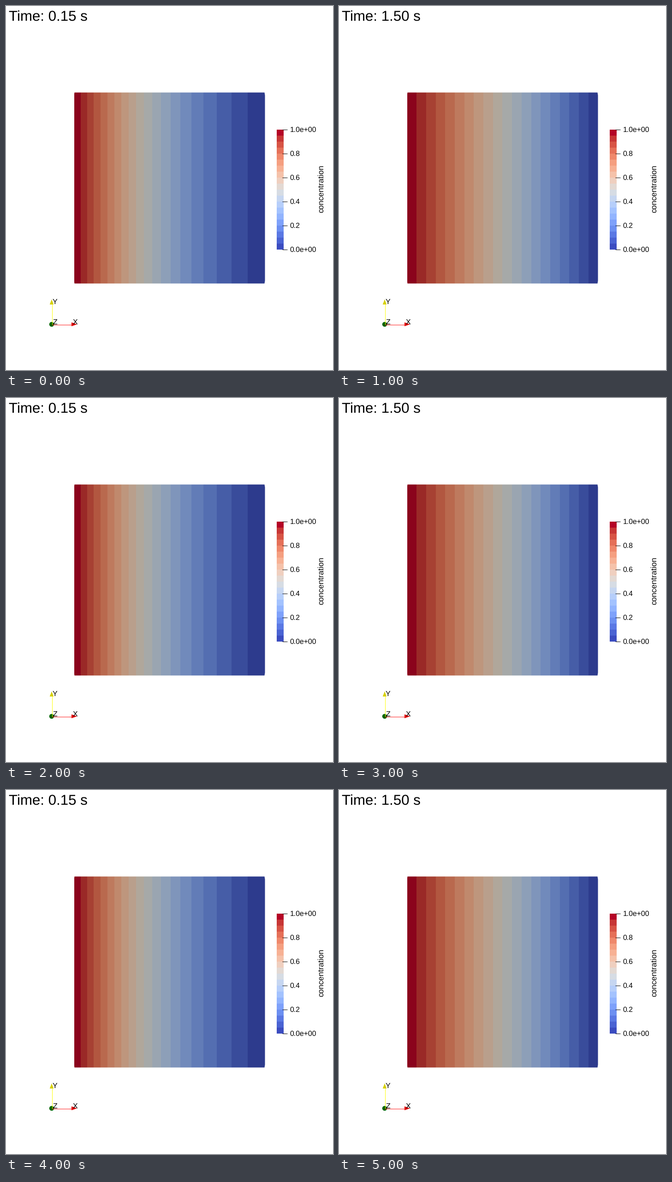
These frames come from a looping animation (709x789 px, 6000 ms). A matplotlib script:

```python
import numpy as np
import matplotlib.pyplot as plt
from matplotlib.animation import FuncAnimation
from matplotlib.patches import Circle, Polygon, Rectangle

W, H, DPI = 709, 789, 128
PX = 72 / DPI  # one pixel in points
LEVELS = 20
HALF = 207  # half the side of the square field
LEFT, TOP = W / 2 - HALF, H / 2 - HALF
TIMES = [0.15, 1.50]
LIGHT = np.array([0.775, 0.77, 0.735])  # slightly warm shading of the field

plt.rcParams["font.family"] = "Liberation Sans"
plt.rcParams["text.hinting"] = "none"


def concentration(x, t):
    """Diffusion into an empty unit slab held at 1 on the left, 0 on the right."""
    n = np.arange(1, 60)[:, None]
    decay = np.exp(-(n * np.pi) ** 2 * t)
    series = 2 / (n * np.pi) * np.sin(n * np.pi * x) * decay
    return 1 - x - series.sum(axis=0)


def band_edges(t):
    """Pixel columns where the concentration crosses each colour level."""
    x = np.linspace(0, 1, 1001)
    levels = np.linspace(0, 1, LEVELS + 1)
    pos = np.interp(levels, concentration(x, t)[::-1], x[::-1])[::-1]
    return LEFT + 2 * HALF * pos


def write(text, x, y, size, **kw):
    return ax.text(x, y, text, size=size * PX, color="black", ha="left",
                   va="baseline", **kw)


def line(xs, ys, color="black", width=1.0):
    ax.plot(xs, ys, color=color, lw=width * PX, solid_capstyle="butt")


def shape(patch):
    return ax.add_patch(patch)


fig = plt.figure(figsize=(W / DPI, H / DPI), dpi=DPI, facecolor="white")
ax = fig.add_axes([0, 0, 1, 1])
ax.set_xlim(0, W)
ax.set_ylim(H, 0)
ax.axis("off")
ax.set_autoscale_on(False)

colors = plt.get_cmap("coolwarm")(np.linspace(1, 0, LEVELS))[:, :3]

# Concentration field, its corners drawn in slightly by perspective
corner = np.array([(HALF - 1, HALF), (HALF, HALF - 6)])
outline = np.concatenate([corner, corner[::-1] * (1, -1),
                          -corner, corner[::-1] * (-1, 1)])
clip = shape(Polygon(outline + (W / 2, H / 2), fc="none", ec="none"))
bands = []
for color in colors:
    band = shape(Rectangle((LEFT, TOP - 1), 1, 2 * HALF + 2, fc=color * LIGHT,
                           ec="none", antialiased=False))
    band.set_clip_path(clip)
    bands.append(band)

# Colour bar with its scale
for k, color in enumerate(colors):
    shape(Rectangle((587, 268 + 13 * k), 15, 13, fc=color, ec="none",
                    antialiased=False))
for k in range(6):
    y, value = 268 + 52 * k, 1 - k / 5
    label = f"{value:.1f}" + ("e+00" if k in (0, 5) else "")
    line([599, 610], [y - 0.5, y - 0.5])
    write(label, 615.4, y + 5, 15.7)
write("concentration", 688.3, 447.7, 17.2, rotation=90,
      rotation_mode="anchor")

# Orientation axes
ox, oy = 99, 690
line([ox + 0.5, ox + 0.5], [oy, oy - 44], "#ffff00")
line([ox, ox + 44], [oy + 0.5, oy + 0.5], "#ff1a1a")
shape(Polygon([(ox, oy - 54), (ox + 4.2, oy - 43), (ox - 4.2, oy - 43)],
              fc="#d6d000"))
shape(Polygon([(ox + 55, oy), (ox + 43, oy - 4.2), (ox + 43, oy + 4.2)],
              fc="#e00000"))
shape(Circle((ox, oy), 5.2, fc="#006400"))
write("X", ox + 46, oy, 16)
write("Y", ox + 1.8, oy - 44, 16)
write("Z", ox + 2.2, oy - 0.5, 16)

clock = write("", 6.3, 32, 31.2)


def update(i):
    t = TIMES[i % len(TIMES)]
    clock.set_text(f"Time: {t:.2f} s")
    edges = np.round(band_edges(t))
    for band, left, right in zip(bands, edges, edges[1:]):
        band.set_x(left)
        band.set_width(right - left)
    return [clock, *bands]


anim = FuncAnimation(fig, update, frames=6, interval=1000, repeat=True,
                     repeat_delay=0, blit=False)
plt.show()
```
